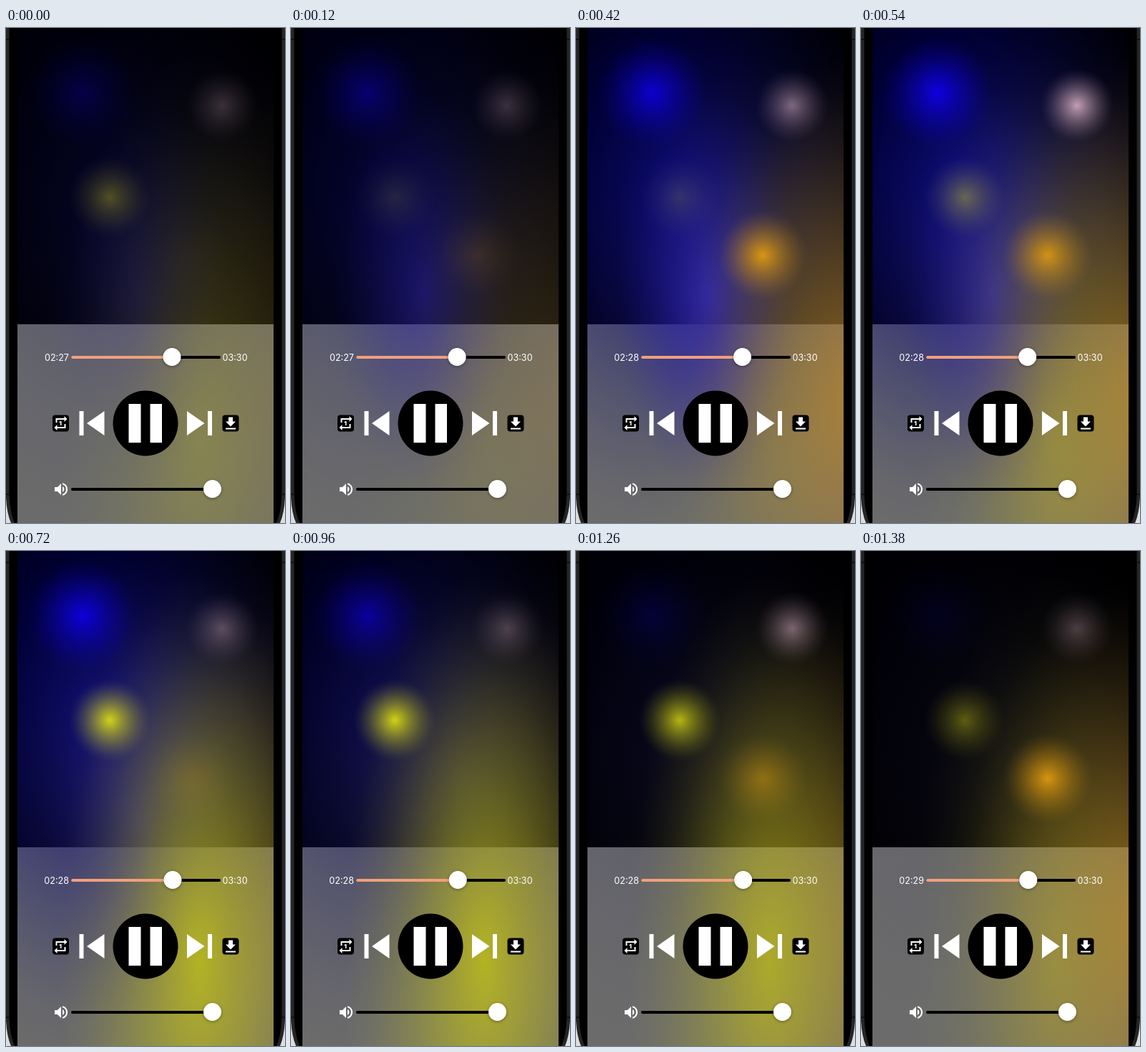
An HTML page with a canvas that plays this animation: 390 by 690 pixels, repeating every 1440 ms.

```html
<!DOCTYPE html>
<html lang="en">
<head>
<meta charset="utf-8">
<title>Music player</title>
<style>
  html, body { margin: 0; width: 100%; height: 100%; overflow: hidden; background: #000; }
  canvas, svg { position: absolute; left: 0; top: 0; }
  text { font: 12.6px Inter, sans-serif; fill: #fff; }
  .thumb { fill: #fff; filter: drop-shadow(0 1px 2px #0006); }
</style>
</head>
<body>
<canvas id="stage" width="390" height="690"></canvas>
<svg width="390" height="690" fill="#fff">
  <!-- phone case -->
  <g id="side">
    <path d="M0 0H4.500V650Q5 674 12 690H0z" fill="#262626"/>
    <path d="M0 655Q1 676 7 690H0z" fill="#ddd"/>
    <path d="M0 16H4M0 650H4" stroke="#111" stroke-width="2"/>
  </g>
  <use href="#side" transform="matrix(-1 0 0 1 390 0)"/>

  <!-- progress -->
  <text id="elapsed" x="88" y="464" text-anchor="end"></text>
  <text x="302.500" y="464">03:30</text>
  <rect x="91" y="457" width="209" height="4" rx="2" fill="#000"/>
  <rect id="played" x="91" y="457" height="4" rx="2" fill="#f0a07c"/>
  <circle id="thumb" class="thumb" cy="458.500" r="12.500"/>

  <!-- transport -->
  <circle cx="195" cy="551" r="45.500" fill="#000"/>
  <path d="M171.500 524h17v54h-17zM201.500 524h16.500v54h-16.500z"/>
  <path d="M102.500 534h6v34h-6zM137.500 534v34L113 551z"/>
  <path d="M282 534h6v34h-6zM253 534v34L277.500 551z"/>
  <rect x="65" y="539.500" width="23" height="23" rx="4" fill="#000"/>
  <path transform="translate(64.500 539)" d="M7 7h10v3l4-4-4-4v3H5v6h2zM17 17H7v-3l-4 4 4 4v-3h12v-6h-2zM13 15V9h-1l-2 1v1h1.500v4z"/>
  <rect x="302.500" y="539.500" width="23" height="23" rx="4" fill="#000"/>
  <path transform="translate(302 539.500)" d="M19 9h-4V3H9v6H5l7 7zM5 18v2h14v-2z"/>

  <!-- volume -->
  <path transform="translate(65 631)" d="M3 9v6h4l5 5V4L7 9zM16.500 12A4.500 4.500 0 0 0 14 8v8a4.500 4.500 0 0 0 2.500-4zM14 3.200v2.100a7 7 0 0 1 0 13.400v2.100a9 9 0 0 0 0-17.600z"/>
  <rect x="91" y="641" width="209" height="4" rx="2" fill="#000"/>
  <circle class="thumb" cx="288.500" cy="642.500" r="12.500"/>
</svg>
<script>
const LOOP = 1440;
const ctx = document.getElementById('stage').getContext('2d');
const elapsed = document.getElementById('elapsed');
const played = document.getElementById('played');
const thumb = document.getElementById('thumb');

// A swell and fade around one moment; gain above 1 holds it at full strength
const swell = (t, peak, width, gain = 1) =>
  Math.min(1, gain * Math.exp(-(((t - peak) / width) ** 2)));

const blue = t => swell(t, 600, 510);
const violet = t => swell(t, 410, 340);
const haze = t => swell(t, 750, 450);
const amber = t => swell(t, 420, 200, 1.35) + swell(t, 1400, 160);
const yellow = t => swell(t, 960, 348, 1.8) + 0.35 * swell(t, 0, 120);
const pink = t => 0.25 + 0.65 * swell(t, 540, 140) + 0.4 * swell(t, 1180, 150);

function glow(x, y, rx, ry, rgb, alpha) {
  const fill = ctx.createRadialGradient(0, 0, 0, 0, 0, 1);
  for (let r = 0; r <= 1; r += 1 / 16) {
    fill.addColorStop(r, `rgba(${rgb},${(alpha * (1 - r) ** 1.4).toFixed(4)})`);
  }
  ctx.save();
  ctx.translate(x, y);
  ctx.scale(rx, ry);
  ctx.fillStyle = fill;
  ctx.fillRect(-1, -1, 2, 2);
  ctx.restore();
}

function drawLights(t) {
  // wide washes
  glow(130, 230, 330, 480, '0,0,130', 0.95 * blue(t));
  glow(185, 370, 130, 290, '25,15,205', 0.95 * violet(t));
  glow(240, 320, 300, 350, '85,80,80', 0.1 + 0.4 * haze(t));
  glow(390, 520, 260, 480, '185,130,45', 0.15 + 0.65 * amber(t));
  glow(270, 570, 200, 540, '195,195,22', 0.83 * yellow(t));
  // small lamps
  glow(107, 90, 80, 80, '15,0,235', 0.95 * blue(t));
  glow(302, 108, 52, 52, '215,175,195', pink(t));
  glow(145, 236, 58, 58, '220,220,20', 0.95 * yellow(t));
  glow(261, 317, 64, 64, '225,155,15', 0.95 * amber(t));
}

function draw() {
  const t = performance.now() % LOOP;
  ctx.fillStyle = '#000';
  ctx.fillRect(0, 0, 390, 690);
  ctx.save();
  ctx.beginPath();
  ctx.rect(16, 0, 358, 690);
  ctx.clip();
  ctx.fillStyle = '#6b6b6b';
  ctx.fillRect(16, 413, 358, 277);
  drawLights(t);
  ctx.restore();

  const head = 232 + 1.9 * t / LOOP;
  thumb.setAttribute('cx', head);
  played.setAttribute('width', head - 91);
  elapsed.textContent = '02:' + (27 + Math.floor((t + 670) / 1000));
  requestAnimationFrame(draw);
}
draw();
</script>
</body>
</html>
```
